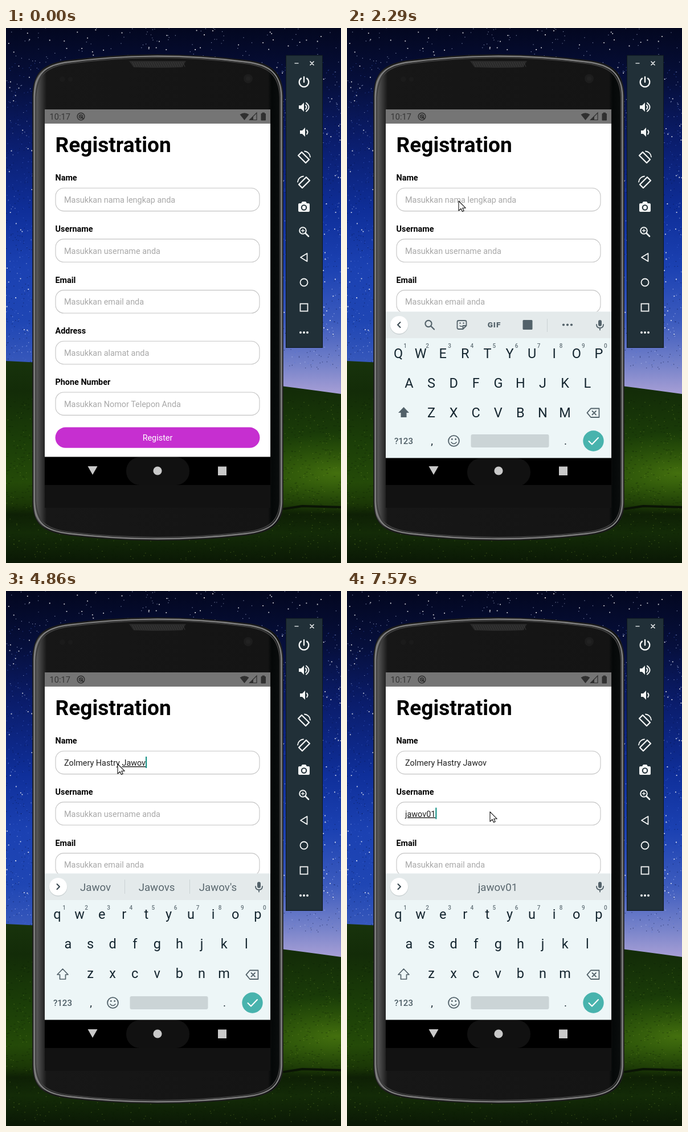
An HTML page for the animation above (8000 ms loop, 588x940 px).

```html
<!DOCTYPE html>
<html lang="id">
<head>
<meta charset="utf-8">
<title>Registration form</title>
<style>
html, body { margin: 0; width: 100%; height: 100%; overflow: hidden; background: #030720; }
svg { display: block; width: 588px; height: 940px; }
text { font-family: Roboto, "Noto Sans", sans-serif; white-space: pre; }
.line { fill: none; stroke-linecap: round; stroke-linejoin: round; }
.mid { text-anchor: middle; }
</style>
</head>
<body>
<svg id="stage" viewBox="0 0 588 940"></svg>
<script>
const stage = document.getElementById('stage');
const ink = '#14252f', slate = '#53626a';

const text = (x, y, s, size, fill, extra = '') =>
  `<text x="${x}" y="${y}" font-size="${size}" fill="${fill}" ${extra}>${s}</text>`;
const mid = (x, y, s, size, fill, extra = '') => text(x, y, s, size, fill, 'class="mid" ' + extra);
const rect = (x, y, w, h, fill, extra = '') =>
  `<rect x="${x}" y="${y}" width="${w}" height="${h}" fill="${fill}" ${extra}/>`;
const dot = (x, y, r, fill, extra = '') => `<circle cx="${x}" cy="${y}" r="${r}" fill="${fill}" ${extra}/>`;
const shape = (d, fill, extra = '') => `<path d="${d}" fill="${fill}" ${extra}/>`;
const line = (d, color, w = 2) => `<path class="line" d="${d}" stroke="${color}" stroke-width="${w}"/>`;
const at = (x, y, s, extra = '') => `<g transform="translate(${x} ${y}) ${extra}">${s}</g>`;
const group = (id, s) => `<g id="${id}">${s}</g>`;
const gradient = (id, stops, dir) => `<linearGradient id="${id}" ${dir}>` +
  stops.map(([o, c]) => `<stop offset="${o}" stop-color="${c}"/>`).join('') + '</linearGradient>';

let seed = 7;
const random = () => (seed = (seed * 16807) % 2147483647) / 2147483647;

function specks(n, y0, y1, w, h, color, opacity) {
  let d = '';
  for (let i = 0; i < n; i++) {
    const x = random() * 588, y = y0 + random() * (y1 - y0);
    d += `M${x.toFixed(1)} ${y.toFixed(1)}h${w}`;
  }
  return `<path d="${d}" stroke="${color}" stroke-width="${h}" opacity="${opacity}"/>`;
}

function wallpaper() {
  const down = 'x1="0" y1="0" x2="0" y2="1"';
  const night = [[0, '#030720'], [.15, '#060f3c'], [.3, '#0a1c6a'], [.5, '#0f2f9a'], [.65, '#1b41b2']];
  return '<defs>' +
    gradient('west', [...night, [.8, '#1f46b4'], [1, '#4a66c0']], down) +
    gradient('east', [...night, [.8, '#3c5bbe'], [.92, '#7783ca'], [1, '#a9a0d6']], down) +
    gradient('hill', [[0, '#18330c'], [.15, '#132c08'], [.4, '#1b3e08'], [.6, '#244a08'],
      [.71, '#1a3606'], [.76, '#0e2005'], [.85, '#132b07'], [1, '#0a1805']], down) +
    '<radialGradient id="glow"><stop offset="0" stop-color="#4c7a10" stop-opacity=".8"/>' +
    '<stop offset="1" stop-color="#35600a" stop-opacity="0"/></radialGradient>' +
    gradient('metal', [[0, '#262626'], [.01, '#6a6a6a'], [.018, '#545454'], [.046, '#262626'],
      [.055, '#171717'], [.94, '#141414'], [.955, '#050808'], [.985, '#090c0c'], [1, '#555']], '') +
    '</defs>' +
    rect(0, 0, 266, 645, 'url(#west)') + rect(266, 0, 322, 645, 'url(#east)') +
    specks(1800, 60, 600, 1.3, 1.3, '#04103f', .5) + specks(1800, 60, 600, 1.2, 1.2, '#4a6ee0', .5) +
    specks(900, 0, 590, 1.2, 1.2, '#cdd9ff', .6) + specks(420, 0, 560, 1.8, 1.8, '#fff', .8) +
    shape('M0 585Q250 596 588 643V940H0Z', 'url(#hill)') +
    '<ellipse cx="580" cy="782" rx="190" ry="72" fill="url(#glow)"/>' +
    specks(1500, 650, 935, 3, 1.2, '#0a1c04', .35) + specks(700, 650, 935, 1.4, 1.2, '#7d9c30', .4) +
    line('M488 845L520 840L588 842', '#0a1405', 4);
}

function phone() {
  const body = 'M47 118C48 78 66 62 110 57Q266 37 422 57C466 62 485 78 486 118V835' +
    'C485 872 466 886 422 891Q266 909 110 891C66 886 48 872 47 835Z';
  const ring = (sx, sy, color, w) => at(266.5, 474, at(-266.5, -474,
    `<path d="${body}" fill="none" stroke="${color}" stroke-width="${w}"/>`), `scale(${sx} ${sy})`);
  let mesh = '';
  for (let x = 222; x < 312; x += 4) mesh += `M${x} 60l4 8`;
  return shape(body, 'url(#metal)', 'stroke="#1c1c1c" stroke-width="1.5"') +
    ring(.988, .994, '#808080', 2.4) + ring(.976, .988, '#3c3c3c', 2) +
    shape('M216 58H316L309 69Q266 71 224 69Z', '#292929') + line(mesh, '#3b3b3b', 1) +
    dot(425, 89, 8, '#1d1d1d') + dot(425, 89, 4, '#222') + dot(99, 90, 5, '#1b1b1b') + dot(113, 90, 4, '#1b1b1b');
}

function emulatorBar() {
  const w = '#f4f6f6', x = 523;
  const speaker = shape('M-8-3h4l5-5v16l-5-5h-4z', w);
  const turn = shape('M-10-3L-4-9L9 4L3 10Z', 'none', `stroke="${w}" stroke-width="2.3" stroke-linejoin="round"`) +
    line('M1-10.500A11 11 0 0 1 11-.5', w, 1.8);
  return rect(491.5, 48, 64, 513.5, '#213038', 'stroke="#0d171d"') +
    line('M507 62h6', '#cfd5d7', 1.5) + line('M534 59l6 6m0-6l-6 6', w, 1.6) +
    at(x, 95, line('M-5-6.5A8.3 8.3 0 1 0 5-6.5M0-9V0', w, 2.4)) +
    at(x - 1, 139, speaker + line('M4-3.5Q7 0 4 3.5', w, 2) + line('M5-7.5Q14 0 5 7.5', w, 2)) +
    at(x + 1, 183, speaker + line('M4-3.5Q7 0 4 3.5', w, 2)) +
    at(x, 227, turn) + at(x, 271, turn, 'scale(-1 1)') +
    at(x, 315, shape('M-8-7h3l2-3h6l2 3h3q2 0 2 2v11q0 2-2 2h-16q-2 0-2-2v-11q0-2 2-2z', w) +
      dot(0, .5, 4.2, 'none', 'stroke="#213038" stroke-width="2"')) +
    at(x, 358, dot(-2, -2, 5.8, 'none', `stroke="${w}" stroke-width="2"`) +
      line('M-4.5-2h5M-2-4.5v5', w, 1.3) + line('M3 3l5 5', w, 2.6)) +
    line('M528.5 396V410L517 403Z', w, 1.8) +
    dot(x, 447, 6.5, 'none', `stroke="${w}" stroke-width="1.8"`) +
    rect(516.5, 484.5, 13, 13, 'none', `stroke="${w}" stroke-width="1.8"`) +
    [517, 523, 529].map(cx => dot(cx, 535, 2, w)).join('');
}

function form() {
  const fields = [['Name', 'Masukkan nama lengkap anda'], ['Username', 'Masukkan username anda'],
    ['Email', 'Masukkan email anda'], ['Address', 'Masukkan alamat anda'],
    ['Phone Number', 'Masukkan Nomor Telepon Anda']];
  const g = '#303030';
  return rect(68, 143, 396, 660, '#fff') + rect(68, 143, 396, 25, '#757575') +
    text(76.5, 161, '10:17', 14.6, '#363636') +
    dot(131.5, 155.5, 6.3, 'none', `stroke="${g}" stroke-width="1.6"`) +
    dot(131.5, 155.5, 3, 'none', `stroke="${g}" stroke-width="1.5"`) + line('M131 155l4.5 4.5', g, 1.8) +
    shape('M410.5 152Q418.5 146.5 426.5 152L418.5 162Z', g) +
    shape('M440 149V161.5H427.5Z', 'none', `stroke="${g}" stroke-width="1.2"`) +
    shape('M434 155V161.5H427.5Z', g) +
    rect(447.5, 150, 8.5, 12.5, g, 'rx="1"') + rect(449.5, 148.5, 4.5, 2, g) +
    text(86.5, 217.5, 'Registration', 37.1, '#000', 'font-weight="700"') +
    fields.map(([label, hint], i) => {
      const y = i * 89.7;
      return text(86.5, 268.3 + y, label, 14.4, '#000', 'font-weight="700"') +
        rect(87, 281.2 + y, 358, 40.4, '#fff', 'rx="14.5" stroke="#c3c3c3" stroke-width="1.1"') +
        text(102, 307 + y, hint, 14.4, '#a8a8a8', `id="hint${i}"`) +
        (i < 2 ? text(102, 307 + y, '', 14.4, '#202020', `id="value${i}"`) : '');
    }).join('') +
    rect(86.5, 701.5, 359, 36.3, '#c62fd0', 'rx="18.1"') + mid(266, 725, 'Register', 14.4, '#fff') +
    rect(0, 291, 2, 20, '#0b8c80', 'id="caret"');
}

const navBar = () => rect(68, 753.5, 396, 49.5, '#000') + rect(211, 754, 111, 49, '#111', 'rx="24"');
const navIcons = () => shape('M143.5 770H160.5L152 785Z', '#c9c9c9') + dot(266, 778, 7.6, '#c9c9c9') +
  rect(372, 770.5, 15, 15.5, '#c9c9c9');

function keyRows(rows, shift) {
  return rows.map((row, r) => [...row].map((ch, i) =>
    mid([90, 109, 148][r] + i * 39.1, 576 + r * 52 + shift, ch, 23.5, ink)).join('')).join('');
}

function keyboard() {
  const rows = ['qwertyuiop', 'asdfghjkl', 'zxcvbnm'];
  const arrow = 'M99.5 664L109 674H104.5V682H94.5V674H90Z';
  const hints = [...'1234567890'].map((n, i) =>
    mid(102 + i * 39.1, 560, n, 10, '#65737a', 'font-weight="500"')).join('');
  const button = dot(91.5, 520.5, 16, '#c9d0d2') + dot(91.5, 519.5, 15.6, '#fff');
  const tools = line('M93.5 515L89 519.5L93.5 524', '#37464e') +
    dot(143, 517.5, 5.6, 'none', `stroke="${slate}" stroke-width="2.1"`) + line('M147.5 522l5.5 5.5', slate, 2.3) +
    line('M196 512H207Q209.5 512 209.5 514.5V521L203.5 527H196Q193.5 527 193.5 524.5V514.5Q193.5 512 196 512M203.5 527V521H209.5', slate, 1.8) +
    dot(198.5, 516.5, 1.2, slate) + dot(204.5, 516.5, 1.2, slate) + line('M198 521q2 2 4 1', slate, 1.4) +
    mid(258.5, 524, 'GIF', 13.5, slate, 'font-weight="900" letter-spacing="1"') +
    rect(308.5, 511, 17, 17, slate, 'rx="1.5"') + rect(351, 509, 1, 23, '#cbd2d4') +
    [380, 387, 394].map(x => dot(x, 519.5, 2.1, slate)).join('');
  const words = line('M89.5 515L94 519.5L89.5 524', '#37464e') +
    group('dividers', rect(208, 507, 1, 25, '#cbd2d4') + rect(322, 507, 1, 25, '#cbd2d4')) +
    [157, 264.5, 372].map((x, i) => at(x, 526.5, mid(0, 0, '', 18.7, '#59676e', `id="word${i}"`))).join('');
  return rect(68, 496.5, 396, 257.5, '#edf6f7') + rect(68, 496.5, 396, 46.5, '#e4eaeb') + button +
    group('tools', tools) + group('words', words) +
    rect(441, 511, 6, 11, slate, 'rx="3"') + line('M438 519Q438 525 444 525T450 519M444 525V528.5', slate, 1.8) +
    hints +
    group('upper', keyRows(rows.map(s => s.toUpperCase()), 2) + shape(arrow, slate)) +
    group('lower', keyRows(rows, 0) + line(arrow, slate, 1.7)) +
    line('M428 666.5H442.5V682H428L421.5 674.2Z', slate, 1.8) + line('M430.5 671l6.5 6.5m0-6.5l-6.5 6.5', slate, 1.8) +
    mid(99.5, 729, '?123', 15, '#4c5c64', 'font-weight="500"') +
    mid(149, 730, ',', 19, ink) + mid(383.5, 730, '.', 19, ink) +
    dot(187.5, 723.5, 9.4, 'none', `stroke="${slate}" stroke-width="1.9"`) +
    dot(184.3, 720.5, 1.4, slate) + dot(190.7, 720.5, 1.4, slate) + line('M183 726Q187.5 731 192 726', slate, 1.7) +
    rect(217.5, 712, 137, 23, '#cbd4d6', 'rx="3"') +
    dot(432.5, 723.5, 18.2, '#48b3ad') + line('M424.5 724L430 729.5L441 718', '#fff', 2.1);
}

stage.innerHTML = wallpaper() + phone() + form() + navBar() +
  group('keyboard', keyboard() + navBar()) +
  rect(68, 803, 396, 40, '#121212') + navIcons() + emulatorBar() +
  group('mouse', shape('M0 0V17L4 13.3L6.5 18.5L9.2 17.3L6.8 12.3H12.3Z', '#fff',
    'stroke="#111" stroke-width="1.1" stroke-linejoin="round"'));

const $ = id => document.getElementById(id);
const show = (id, on) => { $(id).style.display = on ? '' : 'none'; };

// The screen refreshes seven times a second; each entry is [tick, what changes].
const start = { mouse: null, caret: 0, field: 0, slide: null };
const steps = [
  [6, { mouse: [182, 396] }], [7, { mouse: [212, 350] }], [8, { mouse: [232, 305] }],
  [10, { mouse: [214, 304], caret: 1 }], [11, { mouse: [196, 304] }], [13, { caret: 0 }],
  [15, { slide: 26 }], [16, { slide: 2 }], [17, { slide: 0, caret: 1 }],
  [37, { mouse: [206, 319] }], [38, { mouse: [232, 358] }], [39, { mouse: [251, 388] }],
  [40, { field: 1 }], [43, { caret: 0 }], [46, { caret: 1 }]
];
// Typing: [tick, field, length typed so far].
const phrases = ['Zolmery Hastry Jawov', 'jawov01'];
const typing = [
  [18, 0, 1], [19, 0, 4], [20, 0, 6], [21, 0, 7], [22, 0, 8],
  [24, 0, 9], [25, 0, 11], [26, 0, 12], [27, 0, 14],
  [31, 0, 15], [32, 0, 16], [33, 0, 18], [34, 0, 20],
  [46, 1, 1], [47, 1, 2], [48, 1, 3], [49, 1, 4], [50, 1, 5], [52, 1, 6], [53, 1, 7]
];
const guesses = {
  '': ['and', 'is', 'the'],
  Zolmer: ['Zolmer', 'Zolmery', "Zolmery's"],
  Hastry: ['Hastry', 'Hasty', 'Hasty-...-round']
};
const suggest = w => /\d/.test(w) ? ['', w, ''] : guesses[w] || [w, w + 's', w + "'s"];

function stateAt(tick) {
  const s = { ...start, values: ['', ''] };
  for (const [n, change] of steps) if (n <= tick) Object.assign(s, change);
  for (const [n, field, len] of typing) if (n <= tick) s.values[field] = phrases[field].slice(0, len);
  return s;
}

function draw(tick) {
  const s = stateAt(tick), typed = s.values[s.field], word = typed.split(' ').pop();
  s.values.forEach((v, i) => {
    const tail = i === s.field ? word : '';
    $('value' + i).innerHTML = v.slice(0, v.length - tail.length) +
      (tail && `<tspan text-decoration="underline">${tail}</tspan>`);
    show('hint' + i, !v);
  });
  const width = typed ? $('value' + s.field).getComputedTextLength() : 0;
  $('caret').setAttribute('transform', `translate(${102 + width} ${s.field * 89.7})`);
  show('caret', s.caret);

  show('mouse', s.mouse);
  if (s.mouse) $('mouse').setAttribute('transform', `translate(${s.mouse})`);

  show('keyboard', s.slide !== null);
  $('keyboard').setAttribute('transform', `translate(0 ${s.slide || 0})`);
  $('keyboard').setAttribute('opacity', s.slide > 2 ? .6 : 1);
  for (const id of ['tools', 'upper']) show(id, !typed);
  for (const id of ['words', 'lower']) show(id, typed);
  const list = suggest(word);
  show('dividers', list[0]);
  list.forEach((w, i) => {
    const el = $('word' + i);
    el.textContent = w;
    // long suggestions are condensed to their slot
    el.setAttribute('transform', `scale(${Math.min(1, 83 / (el.getComputedTextLength() || 1))} 1)`);
  });
}

let last = -1;
function frame(now) {
  const tick = Math.floor((now % 8000) * 7 / 1000 + .03);
  if (tick !== last) draw(last = tick);
  requestAnimationFrame(frame);
}
draw(0);
requestAnimationFrame(frame);
</script>
</body>
</html>
```
